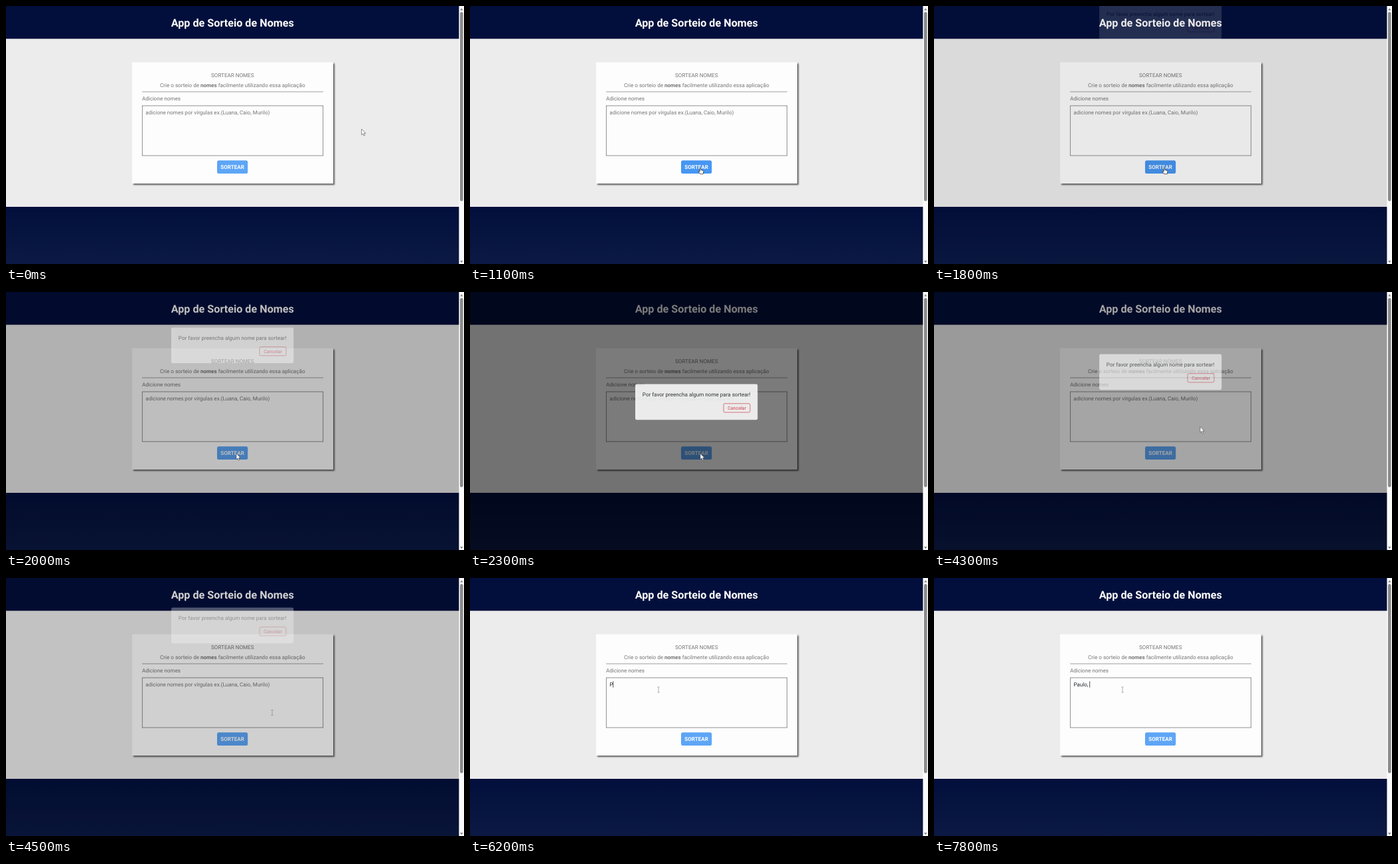
Write an HTML page that moves like this. It is 690 px wide and 388 px high and loops after 8 s.

```html
<!DOCTYPE html>
<html lang="pt-BR">
<head>
<meta charset="utf-8">
<title>App de Sorteio de Nomes</title>
<style>
  html, body { margin: 0; width: 100%; height: 100%; overflow: hidden; background: #020f3c; }
  svg { display: block; width: 100vw; height: 100vh; }
  text { font: 8.08px Roboto, sans-serif; fill: #757575; white-space: pre; text-rendering: geometricPrecision; }
  .mid { text-anchor: middle; }
  .bold { font-weight: 700; }
  .title { font-size: 16.16px; fill: #fff; }
  .card { filter: drop-shadow(2px 2px 1.2px rgba(0, 0, 0, .6)); }
  .line { fill: none; stroke: #767676; }
  .white { fill: #fff; }
  .dark { fill: #212529; }
  .small { font-size: 7.07px; fill: #dc3545; }
  #draw { fill: #5da5f6; }
  #draw.hover { fill: #4696f2; }
  #cancel { fill: none; stroke: #dc3545; }
  #cancel.hover { fill: #dc3545; }
  #cancel.hover + text { fill: #fff; }
  #hint, #caret, #pointer path { visibility: hidden; }
  #hint.on, #caret.on, #pointer path.on { visibility: visible; }
</style>
</head>
<body>
<svg viewBox="0 0 690 388" preserveAspectRatio="none">
  <linearGradient id="foot" x2="0" y2="1">
    <stop stop-color="#020f3c"/>
    <stop offset="1" stop-color="#0b1944"/>
  </linearGradient>
  <rect width="690" height="50" fill="#020f3c"/>
  <rect y="302" width="690" height="86" fill="url(#foot)"/>
  <rect y="49.3" width="683" height="252.7" fill="#ececec"/>
  <text class="mid bold title" x="341.3" y="30.6">App de Sorteio de Nomes</text>

  <rect class="card" x="190" y="84.5" width="303" height="182.5" fill="#fdfdfe"/>
  <text class="mid" x="341.3" y="107">SORTEAR NOMES</text>
  <text class="mid" x="341.3" y="121.8">Crie o sorteio de <tspan class="bold">nomes</tspan> facilmente utilizando essa aplicação</text>
  <path class="line" d="M205 129h273" stroke-width=".7"/>
  <text x="204.9" y="142.4">Adicione nomes</text>
  <rect class="line" x="205.3" y="150" width="272.4" height="75" stroke-width=".8"/>
  <text id="hint" x="210.3" y="162.6">adicione nomes por vírgulas ex.(Luana, Caio, Murilo)</text>
  <text id="typed" class="dark" x="210.3" y="162.6"></text>
  <rect id="caret" y="155.3" width=".7" height="9.4" fill="#111"/>
  <rect id="draw" x="318" y="232.2" width="46.2" height="19.8" rx="2.5"/>
  <text class="mid bold white" x="341.1" y="245">SORTEAR</text>

  <rect id="shade" width="683" height="388"/>
  <g id="modal">
    <rect x="249" width="184.3" height="53.7" rx="2.4" fill="#fff"/>
    <text class="mid dark" x="341.2" y="18.7">Por favor preencha algum nome para sortear!</text>
    <rect id="cancel" x="382" y="29.2" width="40" height="13.2" rx="2" stroke-width=".7"/>
    <text class="mid small" x="402" y="38.2">Cancelar</text>
  </g>

  <rect x="682.4" width="7.6" height="388" fill="#fafafa"/>
  <rect x="684" y="9" width="4.6" height="284.5" rx="2.3" fill="#8a8a8a"/>
  <path d="M686.3 3.2l2.3 3.2h-4.6zM686.3 386.2l2.3-3.2h-4.6z" fill="#8a8a8a"/>

  <g id="pointer">
    <path id="arrow" d="M0 0v8.8l2-1.8 1.4 3.2 1.5-.7-1.4-3.1h2.7z" fill="#fff" stroke="#444" stroke-width=".6"/>
    <path id="hand" d="M-.8.6q.8-1.1 1.6 0v3l3.4.9q.8.3.7 1.3l-.6 3.8h-4.6l-2.6-3.6q0-1.2 1.2-.6l.9.8z" fill="#fff" stroke="#222" stroke-width=".7"/>
    <path id="beam" class="line" d="M-1.7-4h1.2l.5.4.5-.4h1.2M-1.7 4h1.2l.5-.4.5.4h1.2M0-3.6v7.2" stroke-width=".6"/>
  </g>
</svg>
<script>
const LOOP = 8000, STEP = 100, BLINK = 500, FOCUS = 5100;
const $ = id => document.getElementById(id);
const toggle = (id, name, on) => $(id).classList.toggle(name, on);
const ramp = (t, from, to) => Math.min(1, Math.max(0, (t - from) / (to - from)));
const smooth = f => f * f * (3 - 2 * f);

const home = { x: 535.7, y: 185 };
const moves = [
  { from: 100, to: 700, x: 343, y: 252.5 },
  { from: 800, to: 1100, x: 347, y: 243 },
  { from: 2900, to: 3600, x: 385, y: 205 },
  { from: 3700, to: 3800, x: 401, y: 202.5 },
  { from: FOCUS, to: 5300, x: 284, y: 168 }
];
const bursts = [
  { text: "Paulo", from: 6000, gap: 225 },
  { text: ", ", from: 7500, gap: 300 }
];

function mouseAt(t) {
  let { x, y } = home;
  for (const m of moves) {
    const f = smooth(ramp(t, m.from, m.to));
    x += (m.x - x) * f;
    y += (m.y - y) * f;
  }
  return { x, y };
}

function typedAt(t) {
  let words = "", last = FOCUS;
  for (const { text, from, gap } of bursts) {
    [...text].forEach((c, i) => {
      const time = from + i * gap;
      if (time <= t) { words += c; last = time; }
    });
  }
  return { words, last };
}

function inside(id, x, y) {
  const { x: left, y: top, width, height } = $(id).getBBox();
  return x >= left && x <= left + width && y >= top && y <= top + height;
}

function drawModal(t) {
  // The closing dialog stalls midway, then vanishes.
  if (t > 4500) t = t < 5200 ? 4500 : LOOP;
  const enter = ramp(t, 1710, 2400);
  const seen = enter * (1 - ramp(t, 4000, 4715));
  const top = -29 + 196 * enter * (1 - ramp(t, 4000, 4800));
  $("shade").setAttribute("opacity", .6 * seen);
  $("modal").setAttribute("opacity", seen);
  $("modal").setAttribute("transform", `translate(0 ${top})`);
  return { top, open: seen > .4 };
}

function drawMouse(t, { top, open }) {
  const { x, y } = mouseAt(t);
  const onDraw = !open && inside("draw", x, y);
  const onCancel = open && inside("cancel", x, y - top);
  const onField = !open && y < 225 && x > 205 && x < 478;
  const shape = onDraw || onCancel ? "hand" : onField ? "beam" : "arrow";
  toggle("draw", "hover", onDraw);
  toggle("cancel", "hover", onCancel);
  for (const id of ["arrow", "hand", "beam"]) toggle(id, "on", id === shape);
  $("pointer").setAttribute("transform", `translate(${x} ${y})`);
}

function drawField(t) {
  const { words, last } = typedAt(t), typed = $("typed");
  typed.textContent = words;
  toggle("hint", "on", !words);
  toggle("caret", "on", t >= FOCUS && (t - last) % (2 * BLINK) < BLINK);
  $("caret").setAttribute("x", 210.3 + (words ? typed.getComputedTextLength() : 0));
}

function render(now) {
  const t = Math.floor((now % LOOP) / STEP) * STEP;
  drawMouse(t, drawModal(t));
  drawField(t);
}

const start = performance.now();
function tick() {
  render(performance.now() - start);
  requestAnimationFrame(tick);
}
tick();
</script>
</body>
</html>
```
